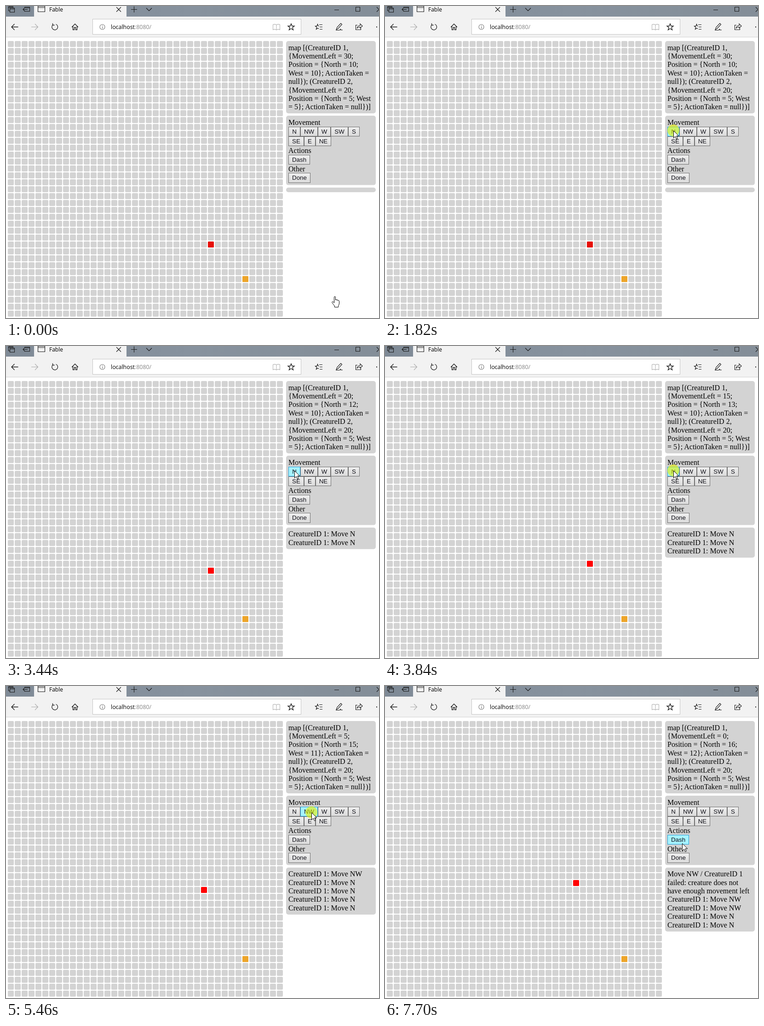
Animation, 811 px wide and 677 px high, one loop 8 s. Source, as an HTML page:

```html
<!DOCTYPE html>
<html lang="en">
<head>
<meta charset="utf-8">
<title>Creature grid</title>
<style>
  html, body { margin: 0; width: 100%; height: 100%; overflow: hidden; background: #fff; }
  svg { display: block; }
  text { white-space: pre; }
  .serif { font: 16px "Liberation Serif", serif; }
  .ui { font: 12px "Open Sans", sans-serif; }
  .panel { fill: #d3d3d3; }
  .icon { fill: none; stroke: #1c1c1c; stroke-width: 1.1; }
  .button rect { fill: url(#face); stroke: #707070; }
  .button text { font: 13.333px "Liberation Sans", sans-serif; fill: #101018; }
  .button.hover rect { fill: #a6f3ff; stroke: #26a0da; }
  .cursor { fill: #fff; stroke: #000; }
</style>
</head>
<body>
<svg width="811" height="677" viewBox="0 0 811 677">
  <defs>
    <linearGradient id="face" x2="0" y2="1">
      <stop stop-color="#efefef"/><stop offset="1" stop-color="#dadada"/>
    </linearGradient>
    <linearGradient id="bar">
      <stop stop-color="#7f8a96"/><stop offset=".5" stop-color="#87929e"/><stop offset="1" stop-color="#848e98"/>
    </linearGradient>
    <pattern id="cells" x="4" y="76" width="15" height="15" patternUnits="userSpaceOnUse">
      <rect class="panel" width="13" height="13" rx="2"/>
    </pattern>
  </defs>

  <!-- Browser window -->
  <rect width="811" height="23" fill="url(#bar)"/>
  <rect y="23" width="811" height="44" fill="#f2f2f2"/>
  <rect x="61" width="201" height="24" fill="#f2f2f2"/>
  <rect y="67" width="811" height="1" fill="#d2d2d2"/>
  <rect x="188.5" y="28.5" width="453" height="33" fill="#fff" stroke="#c6c6c6"/>
  <g class="icon">
    <path d="M8.5 10.5H5.5V1.5H15.5V3.5M8.5 4.5H18.5V13.5H8.5ZM8.5 6.5H18.5M5.5 2.5H15.5"/>
    <path d="M40.5 4V2.5H51.5V11.5H40.5V10M40.5 4H51.5M37 7.5H47M40 4.5L37 7.5L40 10.5"/>
    <path d="M69.5.5H84.5V12.5H69.5ZM69.5 3.5H84.5"/>
    <path d="M240 2.5L250 12.500M250 2.500L240 12.5M272 7.500H285M278.500 1V14M305 4.500L311 10.5L317 4.500"/>
    <path d="M714 8.500H724M760.500 2.500H769.500V11.500H760.500ZM806 2.500L816 12.500M816 2.500L806 12.500"/>
    <path d="M26.500 45.500H12M18.500 39L12 45.500L18.500 52" stroke-width="1.3"/>
    <path d="M55 45.500H69.500M63 39L69.500 45.500L63 52" stroke="#aaa"/>
    <path d="M102 40.600A6.400 6.400 0 1 0 108.500 39.500M101.500 37.500V41.500H105.500" stroke-width="1.3"/>
    <path d="M143 46L150 39L157 46M145.500 44V51.500H148.500V46.500H151.500V51.500H154.500V44" stroke-width="1.3"/>
    <g stroke="#777"><circle cx="209.500" cy="45.500" r="5.500"/><path d="M209.500 44.500V49M209.500 42V43.300"/></g>
    <path d="M588 41Q584 38.500 580.500 40.500V51.500Q584 49.500 588 52Q592 49.500 595.500 51.500V40.500Q592 38.500 588 41V52" stroke="#b5b5b5"/>
    <path d="M620 38.500L622 43.500H627L623 46.800L624.500 52L620 49L615.500 52L617 46.800L613 43.500H618Z" stroke-width="1.300"/>
    <path d="M681 40.500H688M682 45.500H688M682 50.500H688M680.500 43.500H679L677.500 39.500L676 43.500H672.500L675.500 46L674.500 50.500L678 48L680 49.500" stroke-width="1.200"/>
    <path d="M718 51.500L720 46L728 37.500L730.500 40L722 49ZM717.500 52.500H725Q729 48 727.500 52H732"/>
    <path d="M764 41.500H760.500V51.500H771.500V48M763.500 48Q764.500 42.500 770 42.500V38.500L775 43.500L770 48V45.500Q766 45.500 763.500 48Z"/>
    <path d="M805 45.500H807" stroke-width="2"/>
  </g>
  <text class="ui" x="94" y="12">Fable</text>
  <text class="ui" x="228" y="50" style="font-size:12.4px">localhost<tspan fill="#858585">:8080/</tspan></text>

  <!-- Board and side panels -->
  <rect x="4" y="76" width="600" height="600" fill="url(#cells)"/>
  <rect x="514" y="586" width="13" height="13" rx="1.5" fill="#eda52b"/>
  <rect id="creature" width="13" height="13" rx="1.5"/>
  <rect class="panel" x="609" y="76" width="195" height="157" rx="5"/>
  <rect class="panel" x="609" y="238" width="195" height="150.600" rx="5"/>
  <rect id="logPanel" class="panel" x="609" y="394" width="195" rx="5"/>
  <g class="serif">
    <g id="state"></g>
    <text x="614" y="258">Movement</text>
    <text x="614" y="319">Actions</text>
    <text x="614" y="359">Other</text>
    <g id="log"></g>
  </g>
  <g id="buttons"></g>

  <circle id="click" r="13" fill="#e6f000" opacity=".6"/>
  <path id="hand" class="cursor" d="M5.500 14V2.200Q5.500.5 7 .5T8.500 2.200V8Q8.500 6.800 10 6.900T11.500 8.600Q11.600 7.600 13 7.800T14.300 9.500Q14.600 8.700 15.600 9T16.500 10.500V15Q16.500 18 14.500 20.500V23.500H6.500V21Q4 18 1 13.500Q.3 12 1.500 11.500T4 12.600Z"/>
  <path id="arrow" class="cursor" d="M.5.7V16.500L4.200 13L6.700 18.600L9.200 17.500L6.800 12H11.700Z"/>
</svg>
<script>
const DURATION = 8000, LINE = 18.4;
const $ = id => document.getElementById(id);

function add(parent, tag, attrs, content) {
  const node = document.createElementNS("http://www.w3.org/2000/svg", tag);
  for (const key in attrs) node.setAttribute(key, attrs[key]);
  if (content) node.textContent = content;
  return parent.appendChild(node);
}

const buttons = {};
function addButton(label, left, right, top, height = 21) {
  const g = add($("buttons"), "g", { class: "button" });
  add(g, "rect", { x: left + .5, y: top + .5, width: right - left - 1, height: height - 1 });
  add(g, "text", { x: (left + right) / 2, y: top + 15, "text-anchor": "middle" }, label);
  buttons[label] = g;
}
function addRow(labels, edges, top) {
  labels.forEach((label, i) => addButton(label, edges[i], edges[i + 1], top));
}
addRow(["N", "NW", "W", "SW", "S"], [614, 640, 678, 706, 744, 769], 262);
addRow(["SE", "E", "NE"], [614, 648, 673, 707], 283);
addButton("Dash", 614, 661, 323);
addButton("Done", 614, 662, 362, 22);

const commands = ["N", "N", "N", "N", "NW", "NW", "fail"];
const failure = ["Move NW / CreatureID 1", "failed: creature does not", "have enough movement left"];

// start time, cursor, x, y, hovered button, commands done, click glow
const steps = [
  [0, "hand", 708, 630, "", 0],
  [200, "hand", 706, 602, "", 0],
  [400, "hand", 688, 520, "", 0],
  [600, "hand", 656, 402, "", 0],
  [780, "hand", 632, 308, "", 0],
  [980, "hand", 620, 268, "", 0],
  [1200, "arrow", 627, 270, "N", 0],
  [1820, "arrow", 627, 270, "N", 0, true],
  [2020, "arrow", 627, 270, "N", 1],
  [2420, "arrow", 627, 270, "N", 1, true],
  [2620, "arrow", 627, 270, "N", 2],
  [3240, "arrow", 627, 270, "N", 2, true],
  [3440, "arrow", 627, 270, "N", 2],
  [3640, "arrow", 627, 270, "N", 3],
  [3840, "arrow", 627, 270, "N", 3, true],
  [4040, "arrow", 627, 270, "N", 4],
  [4660, "arrow", 659, 265, "NW", 4],
  [4860, "arrow", 664, 274, "NW", 4],
  [5060, "arrow", 664, 274, "NW", 4, true],
  [5260, "arrow", 664, 274, "NW", 5],
  [5460, "arrow", 664, 274, "NW", 5, true],
  [5680, "arrow", 664, 274, "NW", 6],
  [6080, "arrow", 664, 274, "NW", 6, true],
  [6280, "arrow", 664, 274, "NW", 7],
  [7080, "arrow", 660, 308, "", 7],
  [7280, "arrow", 648, 365, "Done", 7],
  [7480, "arrow", 646, 353, "", 7],
  [7700, "arrow", 646, 341, "Dash", 7]
];

function setLines(group, lines, baseline, fraction) {
  group.replaceChildren();
  lines.forEach((line, i) =>
    add(group, "text", { x: 614, y: baseline + Math.floor(fraction + i * LINE) }, line));
}

function showCommands(count) {
  const done = commands.slice(0, count);
  const moves = done.filter(c => c !== "fail");
  const north = 10 + moves.length;
  const west = 10 + moves.filter(c => c === "NW").length;
  setLines($("state"), [
    "map [(CreatureID 1,",
    `{MovementLeft = ${30 - 5 * moves.length};`,
    `Position = {North = ${north};`,
    `West = ${west}}; ActionTaken =`,
    "null}); (CreatureID 2,",
    "{MovementLeft = 20;",
    "Position = {North = 5; West",
    "= 5}; ActionTaken = null})]"
  ], 96, 0);

  const log = done.reverse().slice(0, 5)
    .flatMap(c => c === "fail" ? failure : `CreatureID 1: Move ${c}`);
  setLines($("log"), log, 413, .8);
  $("logPanel").setAttribute("height", 10 + LINE * log.length);

  const creature = $("creature");
  creature.setAttribute("x", 439 - 15 * (west - 10));
  creature.setAttribute("y", 511 - 15 * (north - 10));
  creature.setAttribute("fill", count ? "#ff0000" : "#e60f08");
}

function show([, cursor, x, y, hovered, count, clicking]) {
  for (const id of ["hand", "arrow", "click"]) {
    $(id).setAttribute("transform", `translate(${x} ${y})`);
    $(id).style.display = id === cursor || (id === "click" && clicking) ? "" : "none";
  }
  for (const label in buttons) buttons[label].classList.toggle("hover", label === hovered);
  showCommands(count);
}

const start = performance.now();
let current;
function tick() {
  const time = (performance.now() - start) % DURATION;
  const step = steps.findLast(s => s[0] <= time);
  if (step !== current) show(current = step);
  requestAnimationFrame(tick);
}
tick();
</script>
</body>
</html>
```
